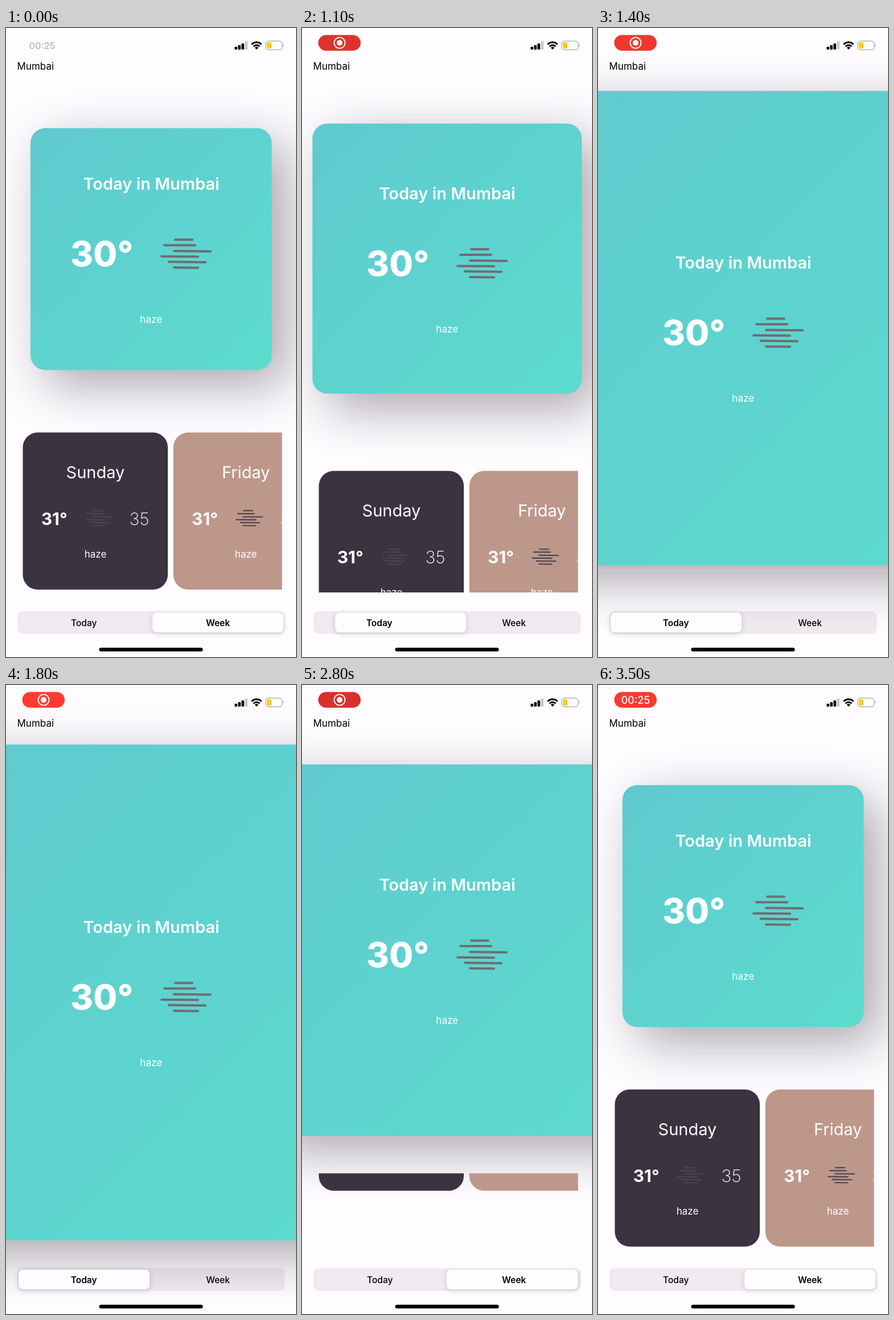
Animation of 509x1101 px, one loop 3600 ms. Source, as an HTML page:

```html
<!DOCTYPE html>
<html lang="en">
<head>
<meta charset="utf-8">
<title>Weather</title>
<style>
  html, body { margin: 0; width: 100%; height: 100%; overflow: hidden; background: #fefcff; }
  svg { display: block; width: 509px; height: 1101px; font-family: Inter, Roboto, sans-serif; }
  .mid { text-anchor: middle; }
  .white { fill: #fff; }
  #card { filter: drop-shadow(26px 26px 44px rgba(20, 10, 25, .36)); }
  #knob { filter: drop-shadow(0 2px 5px rgba(0, 0, 0, .16)); }
</style>
</head>
<body>
<svg viewBox="0 0 509 1101">
  <defs>
    <linearGradient id="sea" x1="0" y1="0" x2="1" y2="1">
      <stop offset="0" stop-color="#5fc9cf"/>
      <stop offset="1" stop-color="#5cdccf"/>
    </linearGradient>
    <clipPath id="view"><rect id="window" x="20" width="464.5"/></clipPath>
    <g id="haze" fill="none" stroke-width="4" stroke-linecap="round">
      <path d="M-19-24.5H11M-38-14.8H16M-21-4.7L43-4M-43 4.8L21 5.3M-30 14.3L34 15M-21 24.2L21 24.7"/>
    </g>
  </defs>

  <rect id="card" rx="26" fill="url(#sea)"/>
  <g id="today" class="white">
    <text class="mid" x="255" y="283" font-size="29" font-weight="600">Today in Mumbai</text>
    <text x="113" y="417" font-size="61" font-weight="800">30°</text>
    <use href="#haze" x="316" y="395" stroke="#736b70"/>
    <text class="mid" x="254.7" y="516" font-size="17">haze</text>
  </g>

  <g clip-path="url(#view)"><g id="days"></g></g>

  <text x="19.5" y="73" font-size="17">Mumbai</text>
  <text id="clock" class="mid" x="63.5" y="36.5" font-size="16" font-weight="600">00:25</text>
  <g id="pill">
    <rect id="pillBox" x="28.5" y="12.3" width="74.5" height="27.4" rx="13.7"/>
    <g id="rec" class="white">
      <circle cx="66" cy="26" r="9.6" fill="none" stroke="#fff" stroke-width="1.9"/>
      <circle cx="66" cy="26" r="5"/>
    </g>
    <text id="pillTime" class="mid white" x="66" y="32.5" font-size="18" font-weight="500">00:25</text>
  </g>

  <rect x="401.3" y="32.8" width="4.6" height="4.9" rx="1.2"/>
  <rect x="407.3" y="30" width="4.6" height="7.7" rx="1.2"/>
  <rect x="413.3" y="27" width="4.6" height="10.7" rx="1.2"/>
  <rect x="419.3" y="23.4" width="4.6" height="14.3" rx="1.2" fill="#c9c6cb"/>
  <g fill="none" stroke="#000" stroke-width="3">
    <path d="M431.2 28.6A12.2 12.2 0 0 1 448.4 28.6"/>
    <path d="M434.4 32.2A7.6 7.6 0 0 1 445.2 32.2"/>
  </g>
  <path d="M436.6 34.4A4.5 4.5 0 0 1 443 34.4L439.8 37.7Z"/>
  <rect x="455.8" y="22.9" width="29" height="15.2" rx="4.6" fill="none" stroke="#a9a6ac" stroke-width="1.2"/>
  <path d="M486.3 28Q488.6 30.5 486.3 33Z" fill="#a9a6ac"/>
  <rect x="458" y="25" width="8" height="11" rx="2.4" fill="#ffcc00"/>

  <rect x="20" y="1021" width="469.5" height="39.5" rx="9.5" fill="rgba(120,95,115,.115)"/>
  <rect id="knob" y="1023.3" width="230" height="34.8" rx="8" fill="#fffdff"/>
  <g class="mid" font-size="15.5">
    <text id="tabToday" y="1046.5">Today</text>
    <text id="tabWeek" y="1046.5">Week</text>
  </g>
  <rect x="163.5" y="1084.7" width="182" height="6.6" rx="3.3"/>
</svg>
<script>
const LOOP = 3600, STEP = 100;
const OPEN = 999, CLOSE = 2559, LENGTH = 488, LEAD = 55;
const $ = id => document.getElementById(id);
const set = (id, attrs) => {
  for (const name in attrs) $(id).setAttribute(name, attrs[name]);
};
const ramp = (t, start, length) => Math.min(1, Math.max(0, (t - start) / length));
const smooth = u => u * u * (3 - 2 * u);
// Critically damped spring from 0 to 1
const spring = ms => {
  const a = Math.max(0, ms) * 0.0214;
  return 1 - (1 + a) * Math.exp(-a);
};

const dayCard = (name, x, color) => `
  <g transform="translate(${x})" class="white">
    <rect y="708" width="254.5" height="275" rx="26" fill="${color}"/>
    <text class="mid" x="127.5" y="788" font-size="29">${name}</text>
    <text class="mid" x="55.3" y="869.5" font-size="30" font-weight="700">31°</text>
    <use href="#haze" transform="translate(133.5 858) scale(.535)" stroke="#4b454c"/>
    <text class="mid" x="204.5" y="869.5" font-size="30" font-weight="200">35</text>
    <text class="mid" x="127.5" y="927" font-size="17">haze</text>
  </g>`;
$('days').innerHTML = dayCard('Sunday', 29.5, '#3c3341') + dayCard('Friday', 293.7, '#be978b');

function drawCards(t) {
  const closing = t >= CLOSE;
  const p = smooth(ramp(t, OPEN, LENGTH)) - smooth(ramp(t, CLOSE, LENGTH));
  const size = 423.5 + 444.5 * p;
  set('card', { x: 254.7 - size / 2, y: 175.2 - 71 * p, width: size, height: size });
  set('today', { transform: `translate(0 ${151 * p})` });
  // The row leaves downwards and comes back from above, behind a moving window
  const top = 703 + 298 * p;
  set('window', { y: top, height: Math.max(0, 988 - top) });
  set('days', { transform: `translate(0 ${(closing ? -192 : 608) * p})` });
}

function drawTabs(t) {
  const k = 1 - spring(t - OPEN + LEAD) + spring(t - CLOSE + LEAD);
  const week = t < OPEN - LEAD || t >= CLOSE - LEAD;
  set('knob', { x: 22 + 235 * k });
  set('tabToday', { x: 136.7 - (week ? 0 : 6 * k), 'font-weight': week ? 500 : 600 });
  set('tabWeek', { x: 372 + (week ? 6 * (1 - k) : 0), 'font-weight': week ? 600 : 500 });
}

function drawStatus(t) {
  const glow = (1 + Math.cos((t - 1800) / 1900 * 2 * Math.PI)) / 2;
  const mix = (a, b) => Math.round(a + (b - a) * glow);
  const time = ramp(t, 3100, 200);
  set('clock', { opacity: 0.25 * (1 - ramp(t, 0, 100)) });
  set('pill', { opacity: ramp(t, 0, 250) });
  set('pillBox', { fill: `rgb(${mix(216, 255)},${mix(49, 59)},${mix(44, 48)})` });
  set('rec', { opacity: 1 - time });
  set('pillTime', { opacity: time });
}

const begin = performance.now();
function frame() {
  const now = (performance.now() - begin) % LOOP;
  const t = Math.floor(now / STEP) * STEP;
  drawCards(t);
  drawTabs(t);
  drawStatus(t);
  requestAnimationFrame(frame);
}
frame();
</script>
</body>
</html>
```
